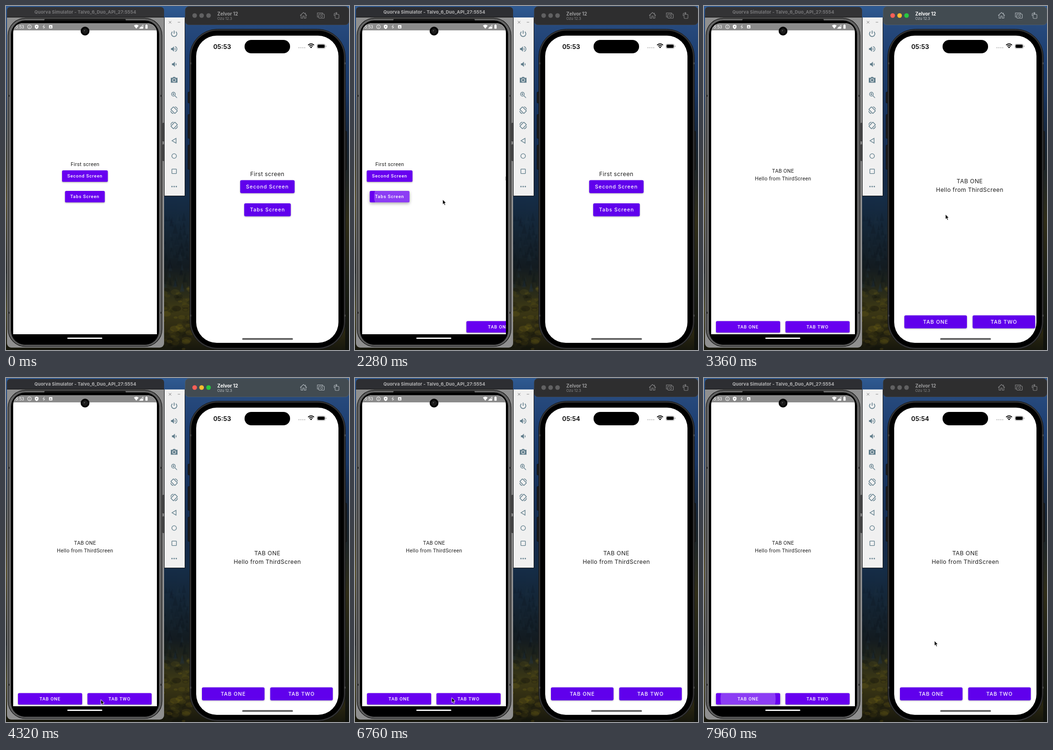
Animation, 716 px wide and 720 px high, one loop 8 s. Source, as an HTML page with a canvas:

```html
<!DOCTYPE html>
<html lang="en">
<head>
<meta charset="utf-8">
<title>Two phones</title>
<style>
html, body { margin: 0; width: 100%; height: 100%; overflow: hidden; background: #14202c; }
canvas { display: block; }
</style>
</head>
<body>
<canvas id="stage" width="716" height="720"></canvas>
<script>
const W = 716, H = 720, LOOP = 8000;
const STEEL = '#607d8b';
const stage = document.getElementById('stage').getContext('2d');
let g = stage;

// drawing helpers
function box(x, y, w, h, r, fill, stroke, lw = 1) {
  g.beginPath();
  g.roundRect(x, y, w, h, r);
  if (fill) { g.fillStyle = fill; g.fill(); }
  if (stroke) { g.strokeStyle = stroke; g.lineWidth = lw; g.stroke(); }
}
function disc(x, y, r, fill, stroke, lw = 1) {
  g.beginPath();
  g.arc(x, y, r, 0, Math.PI * 2);
  if (fill) { g.fillStyle = fill; g.fill(); }
  if (stroke) { g.strokeStyle = stroke; g.lineWidth = lw; g.stroke(); }
}
function path(d, x, y, fill, stroke, lw = 1.2) {
  const p = new Path2D(d);
  g.save();
  g.translate(x, y);
  if (fill) { g.fillStyle = fill; g.fill(p); }
  if (stroke) { g.strokeStyle = stroke; g.lineWidth = lw; g.stroke(p); }
  g.restore();
}
function text(s, x, y, size, family, weight, color, spacing = 0, align = 'center') {
  g.font = `${weight} ${size}px ${family}, sans-serif`;
  g.letterSpacing = spacing + 'px';
  g.textAlign = align;
  g.fillStyle = color;
  g.fillText(s, x, y + size * 0.36);
  g.letterSpacing = '0px';
}
function gradient(y0, y1, stops) {
  const gr = g.createLinearGradient(0, y0, 0, y1);
  stops.forEach(([p, c]) => gr.addColorStop(p, c));
  return gr;
}
function layer(draw) {
  const c = document.createElement('canvas');
  c.width = W;
  c.height = H;
  g = c.getContext('2d');
  draw();
  g = stage;
  return c;
}
function random(seed) {
  return () => (seed = (seed * 16807) % 2147483647) / 2147483647;
}

function wallpaper() {
  g.fillStyle = gradient(0, H, [
    [0, '#2f5a92'], [0.06, '#26497c'], [0.15, '#1d3e70'], [0.3, '#18335c'],
    [0.5, '#152a48'], [0.56, '#152c46'], [0.65, '#142535'], [0.76, '#131b20'],
    [0.82, '#24271a'], [0.88, '#3d3915'], [0.95, '#2a2711'], [1, '#17170d']]);
  g.fillRect(0, 0, W, H);
  const rnd = random(77);
  for (let i = 0; i < 160; i++) {
    const x = 326 + rnd() * 62, y = 440 + rnd() * 280, s = 3 + rnd() * 8;
    const low = y > 590;
    g.globalAlpha = 0.08 + rnd() * 0.16;
    g.fillStyle = low ? (rnd() > 0.5 ? '#857519' : '#0b0e0a') : (rnd() > 0.6 ? '#22384a' : '#080f17');
    g.beginPath();
    if (low) g.ellipse(x, y, s, s * 0.6, 0, 0, 7);
    else { g.moveTo(x, y - s); g.lineTo(x + s / 2, y + s); g.lineTo(x - s / 2, y + s); }
    g.fill();
  }
  g.globalAlpha = 1;
  g.fillStyle = gradient(180, 560, [[0, 'rgba(30,40,38,0)'], [0.4, '#332f1b'], [0.6, '#4a401a'], [1, '#151817']]);
  g.fillRect(0, 180, 3, 380);
  g.fillStyle = gradient(180, 720, [[0, 'rgba(20,30,40,0)'], [0.3, '#1d2528'], [0.5, '#302d18'], [0.75, '#1c1f16'], [1, '#0f110c']]);
  g.fillRect(708, 180, 8, 540);
}

function emulatorFrame() {
  box(2, 24, 328, 691, [0, 0, 9, 9], '#8f8f8f');
  box(4.5, 25.5, 321, 687, 36, '#6c6c6c', '#1b1b1b', 1.5);
  box(8, 28, 314, 682, 33, '#8c8c8c', '#3a3a3a', 1);
  box(10, 30, 310, 679, 30, '#000');
  box(80, 27, 170, 4, 2, '#151515');
  [[245, 38], [290, 34]].forEach(([y, h]) => box(327, y, 3, h, 1, '#555', '#222', 0.7));
  g.fillStyle = '#333';
  [[4, 186], [322, 186], [4, 640], [322, 640]].forEach(([x, y]) => g.fillRect(x, y, 4, 4));
}

function sideTools() {
  box(330, 24, 44, 374, 0, '#101214');
  box(331, 24, 42, 373, 0, '#f0f0f0');
  path('M-2.5-2.5L2.5 2.5M2.5-2.5L-2.5 2.5', 342.5, 34, null, '#777', 1);
  path('M-2.5 0H2.5', 361, 34, null, '#888', 1);
  const x = 351;
  path('M0-6.5V0M-3.6-4.2A5.7 5.7 0 1 0 3.6-4.2', x, 58, null, STEEL, 1.6);
  [90, 122].forEach((y, i) => {
    const dx = i ? 2 : 0;
    path('M-6.5-2H-4L-.5-5.5V5.5L-4 2H-6.5Z', x + dx, y, STEEL);
    path('M1.4-2.8A3.2 3.2 0 0 1 1.4 2.8Z', x + dx, y, STEEL);
    if (!i) path('M1.8-5.2A5.4 5.4 0 0 1 1.8 5.2', x, y, null, STEEL, 1.4);
  });
  path('M-7-4.2H-3.2L-2-6H2L3.2-4.2H7V6H-7Z', x, 154.5, STEEL);
  disc(x, 155.2, 3.2, STEEL, '#f0f0f0', 1.2);
  disc(x - 1.5, 184.5, 4, null, STEEL, 1.3);
  path('M1.5 1.8L6 6.4M-3.5-1.5H.5M-1.5-3.5V.5', x, 186, null, STEEL, 1.3);
  [1, -1].forEach((flip, i) => {
    g.save();
    g.translate(x, 218 + i * 32);
    g.scale(flip, 1);
    path('M1.5-7.2A7.3 7.3 0 0 1 7.2-1.5M-1.5 7.2A7.3 7.3 0 0 1 -7.2 1.5', 0, 0, null, STEEL, 1.3);
    g.rotate(Math.PI / 4);
    box(-6, -3.9, 12, 7.8, 0.8, null, STEEL, 1.5);
    g.restore();
  });
  path('M4-5V5L-4.5 0Z', x, 282, null, STEEL, 1.3);
  disc(x, 314, 4.8, null, STEEL, 1.3);
  box(x - 4.7, 341.3, 9.4, 9.4, 0.6, null, STEEL, 1.3);
  [-4.5, 0, 4.5].forEach(d => disc(x + d, 378, 1.4, STEEL));
}

function rightFrame() {
  [[180, 23], [227, 50], [291, 51]].forEach(([y, h]) => box(380, y, 6, h, 1.5, '#1e1e1f', '#0c0c0c', 0.8));
  box(706, 262, 5, 81, 1.5, '#1e1e1f', '#0c0c0c', 0.8);
  box(383.5, 48.5, 325, 670, 58, '#343435', '#141414', 1);
  box(386.5, 51.5, 319, 664, 55, '#000');
  g.fillStyle = '#444';
  [[384, 118], [706, 118], [384, 646], [706, 646]].forEach(([x, y]) => g.fillRect(x, y, 3, 4));
}

const backdrop = layer(() => {
  wallpaper();
  emulatorFrame();
  sideTools();
  rightFrame();
});

// the two phones: cx is the screen centre, k the scale of one dp
const left = {
  cx: 165, x: 15, y: 36, w: 300, h: 651, r: [20, 20, 0, 0], k: 0.67, font: 'Roboto',
  color: '#6800f0', shade: 0.35,
  first: 331.5, second: [-48, 344, 95.5], go: [-41.8, 387, 83], lines: [345, 361],
  tabs: [[-140, 659.5, 134], [5, 659.5, 134]]
};
const right = {
  cx: 545.5, x: 397, y: 62, w: 297, h: 643, r: 43, k: 0.756, font: 'Inter',
  color: '#6000ec', shade: 0.25,
  first: 352, second: [-56.7, 364.5, 113.7], go: [-48.3, 413, 97.3], lines: [367, 385],
  tabs: [[-136.5, 647.5, 130.7], [6, 647.5, 130.7]]
};

const ease = p => p * p * (3 - 2 * p);
const clamp = (v, a = 0, b = 1) => Math.min(b, Math.max(a, v));
// critically damped spring, stiffness 400
const spring = ms => ms <= 0 ? 0 : 1 - (1 + ms * 0.02) * Math.exp(-ms * 0.02);

function button(ph, spec, label, press) {
  const [dx, y, w] = spec, x = ph.cx + dx, h = 36 * ph.k, r = 4 * ph.k;
  const age = press ? press.age : -1, down = age >= 0 && age < 330;
  g.save();
  g.shadowColor = `rgba(0,0,0,${ph.shade})`;
  g.shadowBlur = down ? 6 : 3;
  g.shadowOffsetY = down ? 2.5 : 1.2;
  box(x, y, w, h, r, ph.color);
  g.restore();
  if (down) {
    const p = clamp(age / 225), grow = 1 - Math.pow(1 - p, 2.2);
    const r0 = w * 0.3, r1 = Math.hypot(w, h) / 2 + 10 * ph.k;
    const fade = clamp(age / 60) * clamp((330 - age) / 105);
    g.save();
    g.beginPath();
    g.roundRect(x, y, w, h, r);
    g.clip();
    const mid = x + w / 2, from = ph.cx + press.dx;
    disc(from + (mid - from) * p, y + h / 2, r0 + (r1 - r0) * grow, `rgba(255,255,255,${0.24 * fade})`);
    g.restore();
  }
  text(label, x + w / 2, y + h / 2, 14 * ph.k, ph.font, 500, '#fff', 1.25 * ph.k);
}

function body(ph, s, y) {
  text(s, ph.cx, y, 16 * ph.k, ph.font, 400, '#1f1f1f', 0.5 * ph.k);
}

function content(ph, slide, tab, goPress, tabPress) {
  g.save();
  g.beginPath();
  g.roundRect(ph.x, ph.y, ph.w, ph.h, ph.r);
  g.fillStyle = '#fff';
  g.fill();
  g.clip();
  if (slide < 0.999) {
    g.save();
    g.translate(-ph.w * slide, 0);
    body(ph, 'First screen', ph.first);
    button(ph, ph.second, 'Second Screen');
    button(ph, ph.go, 'Tabs Screen', goPress);
    g.restore();
  }
  if (slide > 0) {
    g.translate(ph.w * (1 - slide), 0);
    body(ph, ['TAB ONE', 'TAB TWO'][tab], ph.lines[0]);
    body(ph, 'Hello from ' + ['ThirdScreen', 'FourthScreen'][tab], ph.lines[1]);
    ['TAB ONE', 'TAB TWO'].forEach((s, i) => button(ph, ph.tabs[i], s, tabPress && tabPress[i]));
  }
  g.restore();
}

function leftStatus() {
  g.save();
  g.beginPath();
  g.roundRect(15, 36, 300, 200, [20, 20, 0, 0]);
  g.clip();
  g.fillStyle = '#8b8b8b';
  g.fillRect(15, 36, 300, 15);
  text('05:53', 38, 43.5, 9.6, 'Roboto', 400, '#fff', 0, 'right');
  disc(49, 43.5, 4, null, '#fff', 1);
  path('M0-2V-1M0 0V2.2', 49, 43.5, null, '#fff', 1);
  path('M0-4.5L3.8-3V0C3.8 2.5 2 4 0 4.8C-2 4-3.8 2.5-3.8 0V-3Z', 64, 43.5, '#fff');
  disc(64, 43.3, 1.2, '#8b8b8b');
  path('M1-4L-2 .5H2L-1 4', 79, 43.5, null, '#fff', 1);
  box(89.8, 40, 7, 7, 1, '#fff');
  text('A', 93.3, 43.5, 6, 'Roboto', 700, '#777');
  path('M-5-2.5Q0-6 5-2.5L0 4Z', 272, 43.5, '#fff');
  path('M4-4V3.5H-3.5Z', 282, 43.5, null, '#fff', 1);
  path('M4 0V3.5H-3.5L0 0Z', 282, 43.5, '#fff');
  box(291, 39.8, 4.6, 7.8, 0.8, '#fff');
  box(292.2, 38.8, 2.2, 1.4, 0, '#fff');
  g.restore();
  disc(165, 52.5, 9.2, '#050505');
  disc(165, 52.5, 4.6, '#171717', '#343434', 1);
  disc(164, 51.8, 1.3, '#5a5a5a');
  box(128, 694, 73, 2.8, 1.4, '#fff');
}

function rightStatus(clock) {
  text(clock, 451.2, 85, 13, 'Inter', 600, '#000');
  box(498, 71, 95, 28, 14, '#000');
  [0, 1, 2, 3].forEach(i => disc(611.5 + i * 4, 87.3, 1.2, '#c4c4c4'));
  path('M-6.2-2.2A8.8 8.8 0 0 1 6.2-2.2M-3.9 .3A5.5 5.5 0 0 1 3.9 .3', 636.8, 84, null, '#000', 1.8);
  path('M-2.2 2A3.2 3.2 0 0 1 2.2 2L0 4.6Z', 636.8, 84, '#000');
  box(649, 79.5, 17.6, 9.6, 3, null, '#aaa', 0.9);
  box(650.3, 80.8, 15, 7, 2, '#000');
  box(667.6, 82.7, 1.3, 3.2, 0.6, '#aaa');
  box(493, 695, 106, 3.8, 1.9, '#626262');
}

function leftTitle(active) {
  box(2, 2, 328, 22, [7, 7, 0, 0], active ? '#2d2e32' : '#333335');
  g.fillStyle = '#111';
  g.fillRect(2, 23, 328, 1);
  text('Quorva Simulator - Talvo_6_Duo_API_27:5554', 165.5, 13, 9.3, 'Inter', 700, active ? '#b4b4b5' : '#777779', 0.12);
}

function rightTitle(active) {
  box(374, 1, 342, 38.5, 8, active ? '#424b51' : '#2e2e2f', active ? '#59636a' : '#424243', 0.6);
  const lights = active ? ['#fe5f57', '#febc2e', '#28c840'] : ['#616162', '#616162', '#616162'];
  lights.forEach((c, i) => disc(393.8 + i * 14.5, 20, 4.8, c));
  text('Zelvor 12', 441, 16, 9.8, 'Inter', 700, active ? '#fff' : '#9b9b9c', 0, 'left');
  text('Ozu 12.3', 441, 26.5, 7.6, 'Inter', 400, active ? '#c5cacd' : '#8b8b8c', 0, 'left');
  const c = active ? '#aeb5ba' : '#858586';
  path('M-7 0L0-6.5L7 0M-5-1.5V5.5H-1.5V1H1.5V5.5H5V-1.5M4-6V-3', 621, 20, null, c, 1.1);
  path('M-4 3H-7V-5.5H4V-3', 657, 20, null, c, 1.1);
  box(653, 17, 11.5, 8.5, 1.2, null, c, 1.1);
  disc(658.8, 21.3, 2.2, null, c, 1);
  box(687, 17.5, 8, 8.5, 1.2, null, c, 1.1);
  path('M-5 1V-3Q-5-5 -3-5H1M-1-7L1-5L-1-3', 690, 20, null, c, 1.1);
}

// pointer stops: time, x, y
const stops = [
  [1000, 262, 470], [1750, 183, 405], [2330, 183, 405], [2930, 504, 436], [3450, 504, 436],
  [4200, 198, 673], [4600, 198, 673], [5200, 182, 668], [5500, 182, 668], [5950, 110, 670],
  [6200, 110, 670], [6700, 202, 669], [6980, 202, 669], [7550, 92, 670], [7860, 92, 670], [7960, 481, 550]
];
function pointer(t) {
  if (t < stops[0][0]) return;
  let i = stops.findIndex(s => s[0] > t);
  if (i < 0) i = stops.length;
  const a = stops[i - 1], b = stops[i] || a;
  const p = a === b ? 0 : ease((t - a[0]) / (b[0] - a[0]));
  const x = a[1] + (b[1] - a[1]) * p, y = a[2] + (b[2] - a[2]) * p;
  path('M0 0V10.4L2.3 8.3L4 12.2L5.9 11.4L4.2 7.6H7.3Z', x, y, '#000', '#fff', 0.9);
}

// tab presses on the left phone: time, tab, pointer x
const presses = [[5290, 1, 182], [6030, 0, 110], [6830, 1, 202], [7900, 0, 92]];

function draw(t) {
  // the clicked window lights up just before the other one dims
  const leftActive = (t >= 2150 && t < 3070) || t >= 4300;
  const rightActive = t >= 3030 && t < 4340;
  g.drawImage(backdrop, 0, 0);
  leftTitle(leftActive);
  rightTitle(rightActive);

  let tab = 0;
  const tabPress = [null, null];
  presses.forEach(([at, i, x]) => {
    if (t >= at + 50) tab = i;
    if (t >= at) tabPress[i] = { age: t - at, dx: x - left.cx };
  });
  content(left, spring(t - 2225), tab, { age: t - 2215, dx: 8 }, tabPress);
  leftStatus();
  content(right, spring(t - 3095), 0, { age: t - 3040, dx: -41 });
  rightStatus(t < 4900 ? '05:53' : '05:54');
  pointer(t);
}

const start = performance.now();
function tick() {
  draw((performance.now() - start) % LOOP);
  requestAnimationFrame(tick);
}
tick();
</script>
</body>
</html>
```
